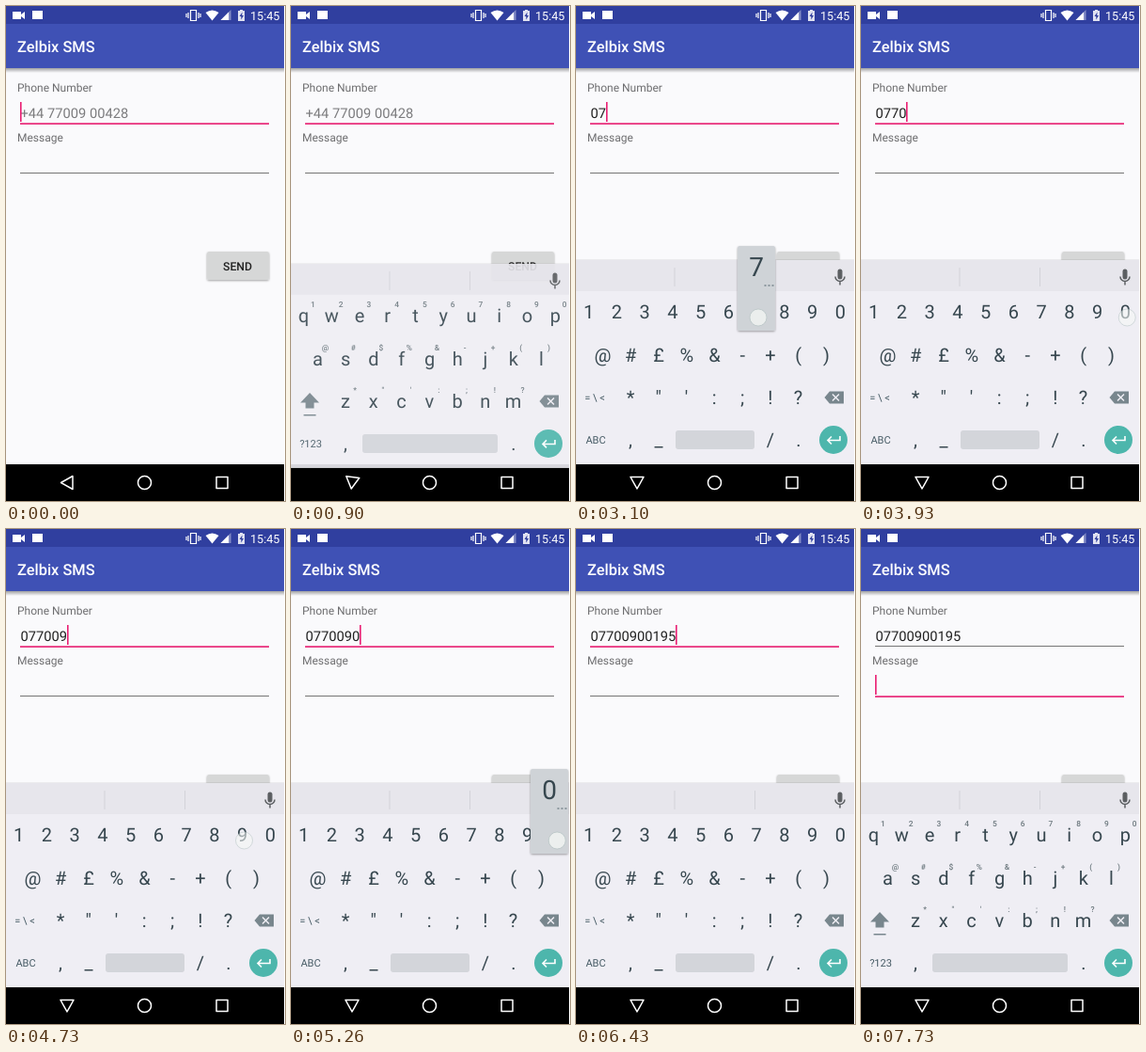
Recreate the animation shown at these times as an HTML page. Size 297 px wide and 526 px high, loop 8000 ms.

```html
<!DOCTYPE html>
<html lang="en">
<head>
<meta charset="utf-8">
<title>SMS form</title>
<style>
html, body { margin: 0; width: 100%; height: 100%; overflow: hidden; background: #fafafc; }
svg { display: block; width: 297px; height: 526px; font-family: Roboto, sans-serif; text-rendering: geometricPrecision; }
.label { font-size: 12px; fill: #6e6e70; }
.entry { font-size: 14.7px; }
.key { font-size: 20px; fill: #37474f; text-anchor: middle; }
.mode { font-size: 11px; fill: #455a64; text-anchor: middle; }
.hint { font-size: 8.4px; font-weight: 500; fill: #6c787e; text-anchor: middle; }
</style>
</head>
<body>
<svg viewBox="0 0 297 526">
  <defs>
    <linearGradient id="drop" x2="0" y2="1">
      <stop offset="0" stop-opacity=".36"/><stop offset="1" stop-opacity="0"/>
    </linearGradient>
    <filter id="shade" x="-20%" y="-20%" width="140%" height="150%">
      <feDropShadow dx="0" dy="1" stdDeviation="1" flood-opacity=".35"/>
    </filter>
  </defs>

  <rect width="297" height="526" fill="#fafafc"/>
  <rect y="66" width="297" height="5" fill="url(#drop)"/>
  <rect y="19" width="297" height="47" fill="#3f51b5"/>
  <rect width="297" height="19" fill="#303f9f"/>
  <text x="12" y="49" font-size="16.4" font-weight="500" fill="#fff">Zelbix SMS</text>

  <g fill="#fff">
    <path d="M7 6h9v3l4-3v8l-4-3v3H7z"/>
    <rect x="28" y="5" width="11" height="9"/>
    <path d="M196.500 4.500h6v11h-6zM194 7v6M192 8v4M205 7v6M207 8v4" fill="none" stroke="#fff" stroke-width="1.200"/>
    <path d="M212.500 7q7-5 14 0l-7 8.500z"/>
    <path d="M239.500 4v11h-11z" opacity=".4"/>
    <path d="M237 6.500V15h-8.500z"/>
    <path d="M247 5h2V4h3v1h2v11h-7z" opacity=".85"/>
    <path d="M251.500 6.500l-3 4.500h1.800v3.500l2.700-4.500h-1.800z" fill="#303f9f"/>
    <text x="260" y="14.500" font-size="12.600">15:45</text>
  </g>

  <text class="label" x="12" y="91">Phone Number</text>
  <text class="label" x="12" y="144">Message</text>
  <text class="entry" id="phone" x="15.500" y="119"></text>
  <rect id="line1" x="15" width="265"/>
  <rect id="line2" x="15" width="265"/>
  <rect id="caret" width="1.600" height="21" fill="#e91e72"/>

  <rect x="214" y="261" width="66" height="30" rx="2" fill="#d6d7d7" filter="url(#shade)"/>
  <text x="246.500" y="281" font-size="12.200" font-weight="500" fill="#212121" text-anchor="middle">SEND</text>

  <rect y="487" width="297" height="39"/>
  <g fill="none" stroke="#fff" stroke-width="1.500" stroke-linejoin="round">
    <path id="back" d="M58.500 506.500l12.500-7v14z"/>
    <circle cx="147.500" cy="506.500" r="7"/>
    <rect x="224" y="500.500" width="12" height="12"/>
  </g>

  <g id="board">
    <rect y="269" width="297" height="1" fill="#000" opacity=".06"/>
    <rect y="270" width="297" height="33" fill="#e7e6ec"/>
    <rect y="303" width="297" height="184" fill="#efeef4"/>
    <path d="M105 278v20M190.500 278v20" stroke="#d3d3d9"/>
    <g fill="none" stroke="#5c5f62" stroke-width="1.500">
      <path d="M281 282v6" stroke-width="5" stroke-linecap="round"/>
      <path d="M276 287.500a5 5 0 0 0 10 0M281 292.500v4"/>
    </g>
    <g id="letters"></g>
    <g id="symbols"></g>
    <path d="M264.500 416l5.500-6.500h15v13h-15z" fill="#78868d"/>
    <path d="M273 412.500l7 7m0-7l-7 7" stroke="#efeef4" stroke-width="1.500"/>
    <circle cx="274" cy="461" r="15" fill="#4db6ac"/>
    <path d="M281 457v4.500h-13m4-4l-4 4 4 4" fill="none" stroke="#fff" stroke-width="1.600"/>
  </g>

  <g id="popup">
    <rect x="-20" y="255" width="40" height="90" rx="2" fill="#cfd3d7" filter="url(#shade)"/>
    <text id="digit" y="287" font-size="28" fill="#37474f" text-anchor="middle"></text>
    <path d="M8.500 297h2m2 0h2m2 0h2" stroke="#78868d" stroke-width="1.500"/>
  </g>
  <circle id="touch" r="9" fill="#f6f8f6" fill-opacity=".75" stroke="#b4c2c2" stroke-opacity=".7"/>
  <rect x="296" width="1" height="526" fill="#fff"/>
</svg>

<script>
const LOOP = 8000, STEP = 29.75, BLINK = 500;
const $ = id => document.getElementById(id);
const set = (node, attrs) => { for (const k in attrs) node.setAttribute(k, attrs[k]); };
const show = (node, on) => set(node, { visibility: on ? 'visible' : 'hidden' });

function add(parent, tag, attrs, text = '') {
  const node = document.createElementNS('http://www.w3.org/2000/svg', tag);
  set(node, attrs);
  node.textContent = text;
  parent.append(node);
}
const label = (parent, cls, x, y, text) => add(parent, 'text', { class: cls, x, y }, text);

function row(parent, chars, x, y, hints = '', shift = 8) {
  [...chars].forEach((c, i) => {
    label(parent, 'key', x + i * STEP, y, c);
    if (hints) label(parent, 'hint', x + i * STEP + shift, y - 16, hints[i]);
  });
}
function bottomRow(parent, mode, x, width) {
  label(parent, 'mode', 21, 465, mode);
  add(parent, 'rect', { x, y: 451, width, height: 20, rx: 3, fill: '#d3d5da' });
  row(parent, ',', 58, 468);
  row(parent, '.', 237, 468);
}

const letters = $('letters'), symbols = $('symbols');
row(letters, 'qwertyuiop', 13.500, 332, '1234567890', 10);
row(letters, 'asdfghjkl', 28.500, 378, '@#$%&-+()');
row(letters, 'zxcvbnm', 58, 423, '*"\':;!?', 10);
add(letters, 'path', { d: 'M20 407l10 10.500h-5.500v6h-9v-6H10zM13.500 430h13v1.500h-13z', fill: '#78868d' });
bottomRow(letters, '?123', 76, 144);

row(symbols, '1234567890', 13.500, 332);
row(symbols, '@#£%&-+()', 28.500, 378);
row(symbols, '*"\':;!?', 58, 423);
label(symbols, 'mode', 20, 420, '= \\ <');
row(symbols, '_', 88, 468);
row(symbols, '/', 207, 468);
bottomRow(symbols, 'ABC', 106, 84);

// Taps: finger down, finger up, position, typed digit
const NUMBER = '07700900195', HINT = '+44 77009 00428';
const RELEASES = [2650, 3095, 3470, 3890, 4300, 4690, 5050, 5300, 5600, 6010, 6280];
const TO_SYMBOLS = 1830, TO_MESSAGE = 6700, POPUP_HOLD = 40, FADE = 155;
const presses = RELEASES.map((up, i) => {
  const key = 13.500 + (+NUMBER[i] + 9) % 10 * STEP;
  return { down: up - 105, up, x: Math.min(key + 2, 286), y: 331, key, digit: NUMBER[i] };
});
const taps = [
  { down: 470, up: 570, x: 150, y: 114 },
  { down: 1700, up: TO_SYMBOLS, x: 21, y: 461 },
  ...presses,
  { down: 6630, up: TO_MESSAGE, x: 148, y: 166 }
];

function underline(node, y, focused) {
  set(node, focused ? { y: y + .2, height: 1.8, fill: '#e9337f' } : { y, height: 1, fill: '#757575' });
}

function caretOn(t, typed) {
  if (t >= TO_MESSAGE) return Math.floor((t - TO_MESSAGE) / BLINK) % 2 === 0;
  return typed > 0 || Math.floor((t + 70) / BLINK) % 2 === 0;
}

function render(t) {
  const typed = RELEASES.filter(r => t >= r).length;
  const inMessage = t >= TO_MESSAGE;
  const phone = $('phone');
  phone.textContent = typed ? NUMBER.slice(0, typed) : HINT;
  set(phone, { fill: typed ? '#212121' : '#7c7c7e' });
  underline($('line1'), 124, !inMessage);
  underline($('line2'), 177, inMessage);
  set($('caret'), { x: inMessage ? 15 : Math.round(15 + typed * 8.250), y: inMessage ? 155 : 102 });
  show($('caret'), caretOn(t, typed));

  const p = Math.min(1, Math.max(0, (t - 740) / 284)), rest = 1 - p;
  set($('board'), { transform: `translate(0 ${21 * rest * rest})`, opacity: Math.min(1, p * 1.6) });
  set($('back'), { transform: `rotate(${-90 * (1 - rest ** 3)} 65 506.500)` });
  const onSymbols = t >= TO_SYMBOLS && !inMessage;
  show(symbols, onSymbols);
  show(letters, !onSymbols);

  const press = presses.find(k => t >= k.down && t < k.up + POPUP_HOLD);
  show($('popup'), press);
  if (press) {
    $('digit').textContent = press.digit;
    set($('popup'), { transform: `translate(${Math.min(275, Math.max(20, press.key))} 0)` });
  }

  const tap = taps.find(k => t >= k.down && t < k.up + FADE);
  show($('touch'), tap);
  if (tap) set($('touch'), { cx: tap.x, cy: tap.y, opacity: Math.min(1, 1 - (t - tap.up) / FADE) });
}

const start = performance.now();
function tick() {
  render((performance.now() - start) % LOOP);
  requestAnimationFrame(tick);
}
tick();
</script>
</body>
</html>
```
